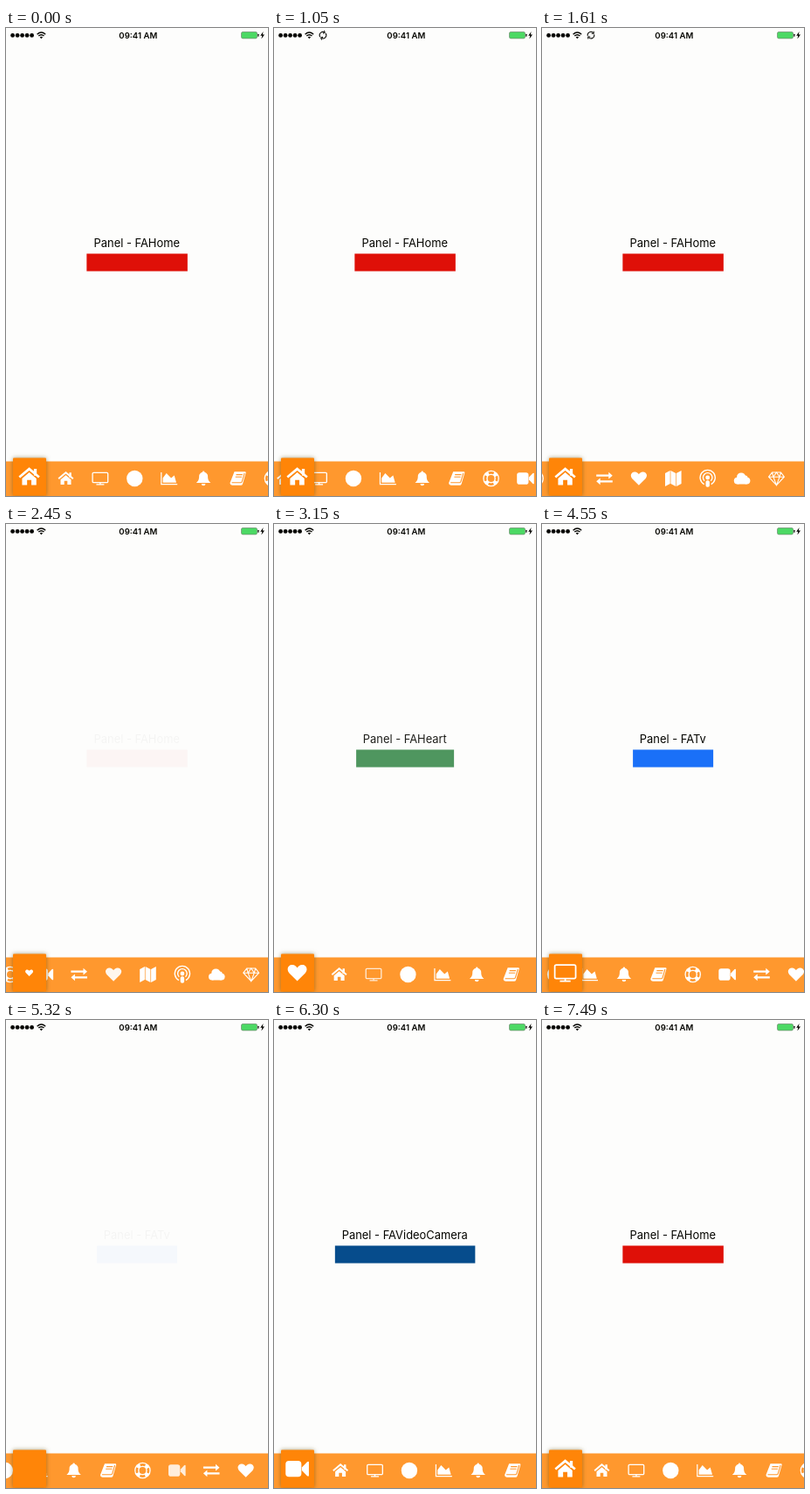
An HTML page that plays this animation: 300x534 px, repeating every 7.77 s.

```html
<!DOCTYPE html>
<html lang="en">
<head>
<meta charset="utf-8">
<title>Tab bar</title>
<style>
  html, body { margin: 0; width: 100%; height: 100%; overflow: hidden; background: #fdfdfc; }
  svg { display: block; width: 100vw; height: 100vh; }
  text { font-family: Inter, Roboto, sans-serif; text-anchor: middle; fill: #050500; }
  .label { font-size: 12.9px; }
  .clock { font-size: 9.6px; font-weight: 600; }
  .icon { fill: #fff; stroke: none; }
  .icon .line { fill: none; stroke: #fff; }
  .icon .cut { fill: none; stroke: #ff982e; }
  .icon .hole { fill: #ff982e; }
  .tile { fill: #ff8508; filter: drop-shadow(0 0 2.5px rgba(80, 65, 0, .5)); }
</style>
</head>
<body>
<svg viewBox="0 0 300 534">
  <rect width="300" height="534" fill="#fdfdfc"/>

  <g id="status" fill="#050500">
    <g id="signal"></g>
    <path d="M35.6 7.2Q40.4 2.8 45.2 7.2M37.3 9.1Q40.4 6.2 43.5 9.1" fill="none" stroke="#050500" stroke-width="1.4"/>
    <path d="M38.7 10.4Q40.4 9 42.1 10.4L40.4 12.2z"/>
    <g id="sync" fill="none" stroke="#050500">
      <path d="M-3.7 .8A3.7 3.7 0 0 1 2.6 -2.6M3.7 -.8A3.7 3.7 0 0 1 -2.6 2.6"/>
      <path d="M3.2 -4.4V-1.9H.7M-3.2 4.4V1.9H-.7"/>
    </g>
    <text class="clock" x="151.3" y="11.8">09:41 AM</text>
    <rect x="269.5" y="4.5" width="18" height="7.4" rx="1.6" fill="#4cd964" stroke="#6a8a6c" stroke-width=".7"/>
    <rect x="288.3" y="6.8" width="1.2" height="3" rx=".5"/>
    <path d="M294.6 4L291.2 8.8H293.3L292.4 12.4L296 7.4H293.8z"/>
  </g>

  <g id="panel">
    <text class="label" x="149.8" y="249.5"></text>
    <rect y="257.5" height="20"/>
  </g>

  <rect y="494.5" width="300" height="39.5" fill="#ff982e"/>
  <g id="strip"></g>
  <rect class="tile" x="8" y="490.5" width="38" height="43" rx="1"/>
  <g id="chosen" class="icon"></g>
</svg>

<script>
const LOOP = 7770, STEP = 39.4, FIRST = 68.5, BIG = 1.36;
const $ = id => document.getElementById(id);
const shape = (d, cls = '', width = 1.2) =>
  `<path class="${cls}" stroke-width="${width}" d="${d}"/>`;
const disc = (x, y, r, cls = '') => `<circle class="${cls}" cx="${x}" cy="${y}" r="${r}"/>`;
const arrow = 'M-9.3 -4.4H4.8V-7.2L9.3 -3.3L4.8 .4V-2.2H-9.3z';

// Icons are drawn around their own centre
const icons = {
  home: shape('M-8.3 .2L0 -6.7L8.3 .2', 'line', 2) +
    shape('M3.9 -6.8H6.3V-1H3.9zM-6 1.3L0 -3.8L6 1.3V6.9H1.8V2.7H-1.8V6.9H-6z'),
  tv: '<rect class="line" x="-8.8" y="-6.7" width="17.6" height="11.4" rx="1.2" stroke-width="1.3"/>' +
    shape('M0 4.7V6.9M-4.5 6.9H4.5', 'line', 1.3),
  disc: disc(0, 0, 9.2),
  chart: shape('M-9.5 -7.1H-8.3V6H9.5V7.2H-9.5zM6 -3.6L8.3 4.8H-7.1V-.6L-3 -6L2.4 -.6z'),
  bell: shape('M-8.3 5C-5 2.5 -5 -1 -5 -2.5C-5 -5.5 -2.5 -7.3 0 -7.3S5 -5.5 5 -2.5C5 -1 5 2.5 8.3 5z') +
    disc(0, -7.4, 1.2) + shape('M-2.3 5.9A2.3 2.3 0 0 0 2.3 5.9z'),
  book: shape('M-4 -7.8H8Q9.6 -7.8 9.1 -6.2L5.5 6.2Q5 7.8 3.4 7.8H-6.5Q-9.2 7.8 -9 5z') +
    shape('M-2 -4.4H5.3M-2.8 -1.8H4.5M-7 4.8H3.4Q4.4 4.8 4.8 3.4L7.6 -6', 'cut', 1.1),
  ring: disc(0, 0, 9.3) + disc(0, 0, 3.9, 'hole') +
    '<circle class="cut" r="6.6" stroke-width="2.7" stroke-dasharray="6 4.37" stroke-dashoffset="3"/>',
  video: '<rect x="-9.8" y="-6.7" width="13.3" height="13.4" rx="2.8"/>' +
    shape('M3.9 -1.3L8.4 -5.9Q9.8 -6.8 9.8 -5.4V5.4Q9.8 6.8 8.4 5.9L3.9 1.3z'),
  swap: shape(arrow) + `<g transform="rotate(180)">${shape(arrow)}</g>`,
  heart: shape('M0 7.7L-7.6 .2C-11 -4 -8 -7.8 -4.6 -7.6C-2.3 -7.5 -.8 -6 0 -4.8' +
    'C.8 -6 2.3 -7.5 4.6 -7.6C8 -7.8 11 -4 7.6 .2z'),
  map: shape('M-9.3 -6L-3.6 -9V6L-9.3 9zM-2.9 -9L2.9 -6V9L-2.9 6zM3.6 -6L9.3 -9V6L3.6 9z'),
  cast: shape('M-4 6.6A8.6 8.6 0 1 1 4 6.6', 'line', 1.4) +
    shape('M-3.6 2.8A5.3 5.3 0 1 1 3.6 2.8', 'line', 1.4) + disc(0, -1, 2.4) +
    '<rect x="-2.2" y="2.2" width="4.4" height="7.6" rx="1.8"/>',
  cloud: disc(-5.4, 2.6, 3.9) + disc(-1, -1.6, 5) + disc(5.4, 2.6, 3.9) + disc(3.6, -.6, 2.8) +
    '<rect x="-5.4" y="0" width="10.8" height="6.5"/>',
  gem: shape('M-8.9 -1.8L-5 -7H5L8.9 -1.8L0 7.6zM-8.9 -1.8H8.9M-5 -7L-3.6 -1.8L0 7.6L3.6 -1.8L5 -7' +
    'M-3.6 -1.8L0 -7L3.6 -1.8', 'line', 1.1),
};

const panels = {
  home: ['Panel - FAHome', 115.5, '#df1008'],
  heart: ['Panel - FAHeart', 112, '#3a8a4c'],
  tv: ['Panel - FATv', 92, '#1a70f8'],
  video: ['Panel - FAVideoCamera', 160.5, '#064c8c'],
};

const easeInOut = k => .5 - .5 * Math.cos(Math.PI * k);
const easeOut = k => 1 - (1 - k) ** 2;

// [time, offset, easing towards it]: flicks run past the end and spring back
const scrolls = [
  [0, 0], [1000, 0], [1540, 313, easeOut], [1990, 300, easeInOut],
  [2660, 300], [3010, -9, easeOut], [3380, 0, easeInOut],
  [4210, 0], [4720, 148.5, easeOut],
  [5900, 148.5], [6250, -8, easeOut], [6620, 0, easeInOut], [LOOP, 0],
];
const taps = [[-1000, 'home'], [2150, 'heart'], [3130, 'tv'], [5130, 'video'], [6620, 'home']];

const clamp = v => Math.max(0, Math.min(1, v));

function scrollAt(t) {
  const i = scrolls.findIndex(s => s[0] > t);
  const [t0, a] = scrolls[i - 1], [t1, b, ease = k => k] = scrolls[i];
  return a + (b - a) * ease((t - t0) / (t1 - t0));
}

for (let i = 0; i < 5; i++) $('signal').innerHTML += disc(7.6 + 5.5 * i, 8.4, 2.4);
$('strip').innerHTML = Object.keys(icons).map((name, i) =>
  `<g class="icon" id="tab-${name}" transform="translate(${FIRST + STEP * i} 514)">${icons[name]}</g>`).join('');

let shownIcon, shownPanel;

function setIcon(name) {
  if (name === shownIcon) return;
  shownIcon = name;
  $('chosen').innerHTML = icons[name];
}

function setPanel(name) {
  if (name === shownPanel) return;
  shownPanel = name;
  const [label, width, fill] = panels[name];
  const [text, bar] = $('panel').children;
  text.textContent = label;
  bar.setAttribute('x', 150.1 - width / 2);
  bar.setAttribute('width', width);
  bar.setAttribute('fill', fill);
}

function draw(t) {
  $('strip').setAttribute('transform', `translate(${-scrollAt(t)} 0)`);

  const n = taps.filter(tap => tap[0] <= t).length - 1;
  const [start, now] = taps[n];
  const before = n ? taps[n - 1][1] : now;
  const p = t - start;

  // The old icon shrinks away, then the new one grows
  const size = p < 180 ? 1 - p / 180 : clamp((p - 200) / 280);
  setIcon(p < 180 ? before : now);
  $('chosen').setAttribute('transform', `translate(26.6 512.2) scale(${size * BIG})`);

  setPanel(p < 310 ? before : now);
  $('panel').setAttribute('opacity', p < 310 ? Math.max(.03, 1 - p / 190) : clamp((p - 310) / 190));

  for (const name in panels)
    $('tab-' + name).setAttribute('opacity', name === now ? .8 + .2 * clamp((p - 150) / 250) : 1);

  const syncing = t >= 70 && t < 2300;
  $('sync').setAttribute('visibility', syncing ? 'visible' : 'hidden');
  $('sync').setAttribute('transform', `translate(56 8.2) rotate(${(t - 1610) * .36})`);
}

const origin = performance.now();
function tick() {
  draw((performance.now() - origin) % LOOP);
  requestAnimationFrame(tick);
}
tick();
</script>
</body>
</html>
```
